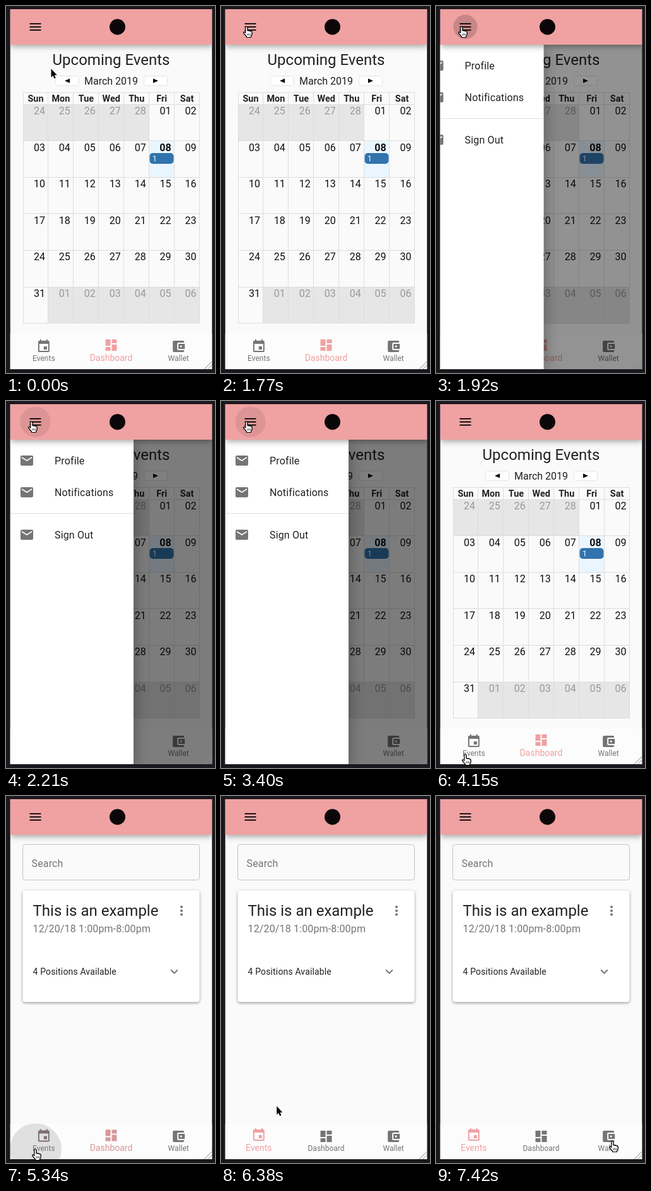
These frames come from a looping animation (331x579 px, 8 s). An HTML page with a canvas:

```html
<!DOCTYPE html>
<html lang="en">
<head>
<meta charset="utf-8">
<title>Event calendar</title>
<style>
  html, body { margin: 0; width: 100%; height: 100%; overflow: hidden; background: #1b181d; }
  canvas { display: block; width: 331px; height: 579px; }
</style>
</head>
<body>
<canvas id="stage"></canvas>
<script>
const W = 331, H = 579, LOOP = 8000;
const canvas = document.getElementById('stage');
const ctx = canvas.getContext('2d');
const dpr = window.devicePixelRatio || 1;
canvas.width = W * dpr;
canvas.height = H * dpr;

const PINK = [240, 161, 162], GRAY = [117, 117, 117];
const INK = 'rgba(0,0,0,.87)', MUTED = '#757575', LINE = '#ddd';
const phone = { x: 6.5, y: 5, w: 320, h: 568 };
const NAV_TOP = 517, BAR_BOTTOM = 61, DRAWER = 195.5;

const icons = {
  menu: 'M3 18h18v-2H3v2zm0-5h18v-2H3v2zm0-7v2h18V6H3z',
  event: 'M17 12h-5v5h5v-5zM16 1v2H8V1H6v2H5c-1.11 0-1.99.9-1.99 2L3 19c0 1.1.89 2 2 2h14c1.1 0 2-.9 2-2V5c0-1.1-.9-2-2-2h-1V1h-2zm3 18H5V8h14v11z',
  dashboard: 'M3 13h8V3H3v10zm0 8h8v-6H3v6zm10 0h8V11h-8v10zm0-18v6h8V3h-8z',
  wallet: 'M21 18v1c0 1.1-.9 2-2 2H5c-1.11 0-2-.9-2-2V5c0-1.1.89-2 2-2h14c1.1 0 2 .9 2 2v1h-9c-1.11 0-2 .9-2 2v8c0 1.1.89 2 2 2h9zm-9-2h10V8H12v8zm4-2.5c-.83 0-1.5-.67-1.5-1.5s.67-1.5 1.5-1.5 1.5.67 1.5 1.5-.67 1.5-1.5 1.5z',
  mail: 'M20 4H4c-1.1 0-1.99.9-1.99 2L2 18c0 1.1.9 2 2 2h16c1.1 0 2-.9 2-2V6c0-1.1-.9-2-2-2zm0 4l-8 5-8-5V6l8 5 8-5v2z',
  expand: 'M16.59 8.59L12 13.17 7.41 8.59 6 10l6 6 6-6z',
  arrow: 'M0 0V13.5L3 10.8L5 15.5L7.2 14.5L5.2 10H9.3z',
  hand: 'M-1.6 9V.8a1.5 1.5 0 0 1 3 0V6q1.3-1 2.6.4q1.4-.8 2.5.6q2-.5 2 1.6v3.4l-1.5 3v1.5h-7v-1.3l-4.5-5.4q-.8-1.6.8-1.8q1 0 2 1.5z',
  knuckles: 'M1.6 10.5v3M3.7 10.5v3M5.8 10.5v3'
};
for (const k in icons) icons[k] = new Path2D(icons[k]);

// Bursts of screen updates: start, end, number of updates
const bursts = [
  [140, 870, 6], [1770, 2210, 4], [3400, 4150, 6],
  [5340, 5780, 4], [6380, 6970, 5], [7270, 7420, 2]
];

// Pointer moves: start, end, updates, then a quadratic curve
const moves = [
  [140, 870, 6, 71, 99, 44, 8, 40, 33],
  [3850, 4150, 3, 40, 33, 75, 300, 46, 558],
  [6380, 6970, 5, 46, 558, 150, 355, 257, 461],
  [7270, 7420, 2, 257, 461, 264, 510, 279, 545]
];

const clamp = v => Math.max(0, Math.min(1, v));
const lerp = (a, b, p) => a + (b - a) * p;
const smooth = p => p * p * (3 - 2 * p);
const mix = (a, b, p) => `rgb(${a.map((v, i) => Math.round(lerp(v, b[i], p)))})`;

function snap(t) {
  let s = 0;
  for (const [a, b, n] of bursts) {
    for (let k = 0; k < n; k++) {
      const at = Math.round((a + (b - a) * k / (n - 1)) / 10) * 10;
      if (t >= at) s = at;
    }
  }
  return s;
}

function text(str, x, y, size, color = INK, { align = 'left', weight = 400, gap = 0 } = {}) {
  ctx.font = `${weight} ${size}px Roboto, sans-serif`;
  ctx.letterSpacing = gap + 'px';
  ctx.textAlign = align;
  ctx.fillStyle = color;
  ctx.fillText(str, x, y);
}

function rect(x, y, w, h, color) {
  ctx.fillStyle = color;
  ctx.fillRect(x, y, w, h);
}

function box(x, y, w, h, r, fill, stroke) {
  ctx.beginPath();
  ctx.roundRect(x, y, w, h, r);
  if (fill) { ctx.fillStyle = fill; ctx.fill(); }
  if (stroke) { ctx.strokeStyle = stroke; ctx.lineWidth = 1; ctx.stroke(); }
}

function dot(x, y, r, color) {
  ctx.fillStyle = color;
  ctx.beginPath();
  ctx.arc(x, y, r, 0, Math.PI * 2);
  ctx.fill();
}

function line(x1, y1, x2, y2, color) {
  ctx.strokeStyle = color;
  ctx.lineWidth = 1;
  ctx.beginPath();
  ctx.moveTo(x1, y1);
  ctx.lineTo(x2, y2);
  ctx.stroke();
}

function icon(name, x, y, color) {
  ctx.save();
  ctx.translate(x, y);
  ctx.fillStyle = color;
  ctx.fill(icons[name]);
  ctx.restore();
}

function withShadow(blur, dy, alpha, draw) {
  ctx.save();
  ctx.shadowColor = `rgba(0,0,0,${alpha})`;
  ctx.shadowBlur = blur * dpr;
  ctx.shadowOffsetY = dy * dpr;
  draw();
  ctx.restore();
}

function monthButton(x, dir) {
  box(x, 110.5, 37, 15, 3, '#fff', '#e4e4e4');
  const c = x + 18.5;
  ctx.fillStyle = '#000';
  ctx.beginPath();
  ctx.moveTo(c + 4 * dir, 118);
  ctx.lineTo(c - 4 * dir, 114.5);
  ctx.lineTo(c - 4 * dir, 121.5);
  ctx.fill();
}

function calendar() {
  const left = 27, top = 155, cw = 279.5 / 7, rh = 57.6;
  const colX = c => left + c * cw;
  const crisp = v => Math.floor(v) + .5;

  text('Upcoming Events', 166.5, 93, 24, INK, { align: 'center' });
  text('March 2019', 166.5, 124, 16, INK, { align: 'center' });
  monthButton(78.5, -1);
  monthButton(218.5, 1);

  rect(left, top, cw * 5, rh, '#e6e6e6');
  rect(colX(1), top + rh * 5, cw * 6, rh, '#e6e6e6');
  rect(colX(5), top + rh, cw, rh, '#eaf6ff');

  for (let r = 0; r <= 6; r++) {
    const y = crisp(top + r * rh);
    line(left, y, 306.5, y, LINE);
  }
  line(left, 136.5, 306.5, 136.5, LINE);
  for (let c = 0; c <= 7; c++) {
    const x = crisp(colX(c));
    line(x, 136.5, x, 500.5, LINE);
  }

  ['Sun', 'Mon', 'Tue', 'Wed', 'Thu', 'Fri', 'Sat'].forEach((d, c) =>
    text(d, colX(c + .5), 151, 14.4, INK, { align: 'center', weight: 700 }));

  for (let i = 0; i < 42; i++) {
    const n = i - 4;
    const off = n < 1 || n > 31;
    const day = n < 1 ? n + 28 : n > 31 ? n - 31 : n;
    text(String(day).padStart(2, '0'), colX(i % 7 + 1) - 5,
      top + Math.floor(i / 7) * rh + 16, 16, off ? '#999' : '#111',
      { align: 'right', weight: n === 8 ? 700 : 400 });
  }

  box(227.5, 232, 38, 17, 5, '#3174ad');
  text('1', 232, 245, 12, '#fff');
}

function eventList() {
  box(26.5, 76.5, 280, 56, 4, null, '#c2c2c2');
  text('Search', 40.5, 112, 16, MUTED, { gap: .15 });

  withShadow(4, 1.5, .4, () => box(26.5, 149, 280, 176, 4, '#fff'));
  text('This is an example', 42.5, 189, 24);
  text('12/20/18 1:00pm-8:00pm', 42.5, 214.5, 16, MUTED, { gap: .15 });
  for (let i = 0; i < 3; i++) dot(278, 175 + 6 * i, 2, MUTED);
  text('4 Positions Available', 42.5, 281.5, 14, INK, { gap: .15 });
  icon('expand', 254.5, 265, MUTED);
}

function navItem(i, name, label, tint, grow) {
  const x = phone.x + phone.w * (i + .5) / 3;
  const color = mix(GRAY, PINK, tint);
  icon(name, x - 12, 525 - 2 * tint, color);
  text(label, x, 560, 12 + 2 * grow, color, { align: 'center' });
}

function nav(s) {
  const tint = clamp((s - 5290) / 250), grow = clamp((s - 5390) / 200);
  rect(phone.x, NAV_TOP, phone.w, 56, '#fcfcfc');
  navItem(0, 'event', 'Events', tint, grow);
  navItem(1, 'dashboard', 'Dashboard', 1 - tint, 1 - grow);
  navItem(2, 'wallet', 'Wallet', 0, 0);

  const age = s - 5290;
  if (age > 0 && age < 480) {
    ctx.save();
    ctx.beginPath();
    ctx.rect(phone.x, NAV_TOP, phone.w / 3, 56);
    ctx.clip();
    dot(47, 557.5, 26 + age * .3, `rgba(0,0,0,${.11 * clamp((480 - age) / 300)})`);
    ctx.restore();
  }
}

function drawer(open) {
  if (!open) return;
  rect(phone.x, BAR_BOTTOM, phone.w, 512, `rgba(0,0,0,${.5 * open})`);
  ctx.save();
  ctx.translate(phone.x - DRAWER * (1 - open), 0);
  withShadow(22, 4, .35, () => rect(0, BAR_BOTTOM, DRAWER, 512, '#fff'));
  [['Profile', 94], ['Notifications', 144], ['Sign Out', 211]].forEach(([label, y]) => {
    icon('mail', 14.5, y - 12, MUTED);
    text(label, 70.5, y + 5.5, 16, INK, { gap: .15 });
  });
  line(0, 177.5, DRAWER, 177.5, '#e0e0e0');
  ctx.restore();
}

function header(s) {
  withShadow(9, 3, .35, () => rect(phone.x, phone.y, phone.w, BAR_BOTTOM - phone.y, mix(PINK, PINK, 0)));
  if (s >= 1920 && s < 3850) {
    const flash = t0 => s < t0 ? 0 : clamp(1 - (s - t0 - 120) / 300);
    const r = 24 * Math.min(1, .5 + (s - 1800) / 400);
    dot(46.5, 33, r, `rgba(0,0,0,${.08 + .09 * (flash(1800) + flash(3430))})`);
  }
  icon('menu', 34.5, 21, INK);
  dot(176.5, 33, 12.5, '#0b0708');
}

function pointer(s) {
  const m = moves.filter(v => s >= v[0]).pop() || moves[0];
  const [a, b, n, x0, y0, cx, cy, x1, y1] = m;
  const p = s < a ? 0 : clamp((1 + (n - 1) * (s - a) / (b - a)) / n);
  const curve = (u, v, w) => lerp(lerp(u, v, p), lerp(v, w, p), p);
  const x = curve(x0, cx, x1), y = curve(y0, cy, y1);
  const hand = y > NAV_TOP || Math.hypot(x - 46.5, y - 33) < 24;

  ctx.save();
  ctx.translate(x + .5, y);
  ctx.lineJoin = 'round';
  ctx.lineWidth = hand ? 1.1 : 1.6;
  ctx.strokeStyle = hand ? '#000' : '#fff';
  ctx.fillStyle = hand ? '#fff' : '#000';
  const shape = hand ? icons.hand : icons.arrow;
  ctx.stroke(shape);
  ctx.fill(shape);
  if (hand) {
    ctx.stroke(shape);
    ctx.lineWidth = .8;
    ctx.stroke(icons.knuckles);
  }
  ctx.restore();
}

function drawerOpen(s) {
  const opened = 1 - Math.pow(1 - clamp((s - 1800) / 225), 2.4);
  return opened * (1 - smooth(clamp((s - 3430) / 195)));
}

function render(t) {
  const s = snap(t);
  ctx.setTransform(dpr, 0, 0, dpr, 0, 0);
  rect(0, 0, W, H, '#1b181d');

  ctx.save();
  ctx.beginPath();
  ctx.rect(phone.x, phone.y, phone.w, phone.h);
  ctx.clip();
  rect(phone.x, phone.y, phone.w, phone.h, '#fafafa');
  if (s < 5340) calendar(); else eventList();
  nav(s);
  drawer(drawerOpen(s));
  header(s);
  line(314, 573, 327, 560, '#8a8a8a');
  line(319.5, 573, 327, 565.5, '#8a8a8a');
  ctx.restore();

  pointer(s);
}

const start = performance.now();
function tick() {
  render((performance.now() - start) % LOOP);
  requestAnimationFrame(tick);
}
tick();
</script>
</body>
</html>
```
